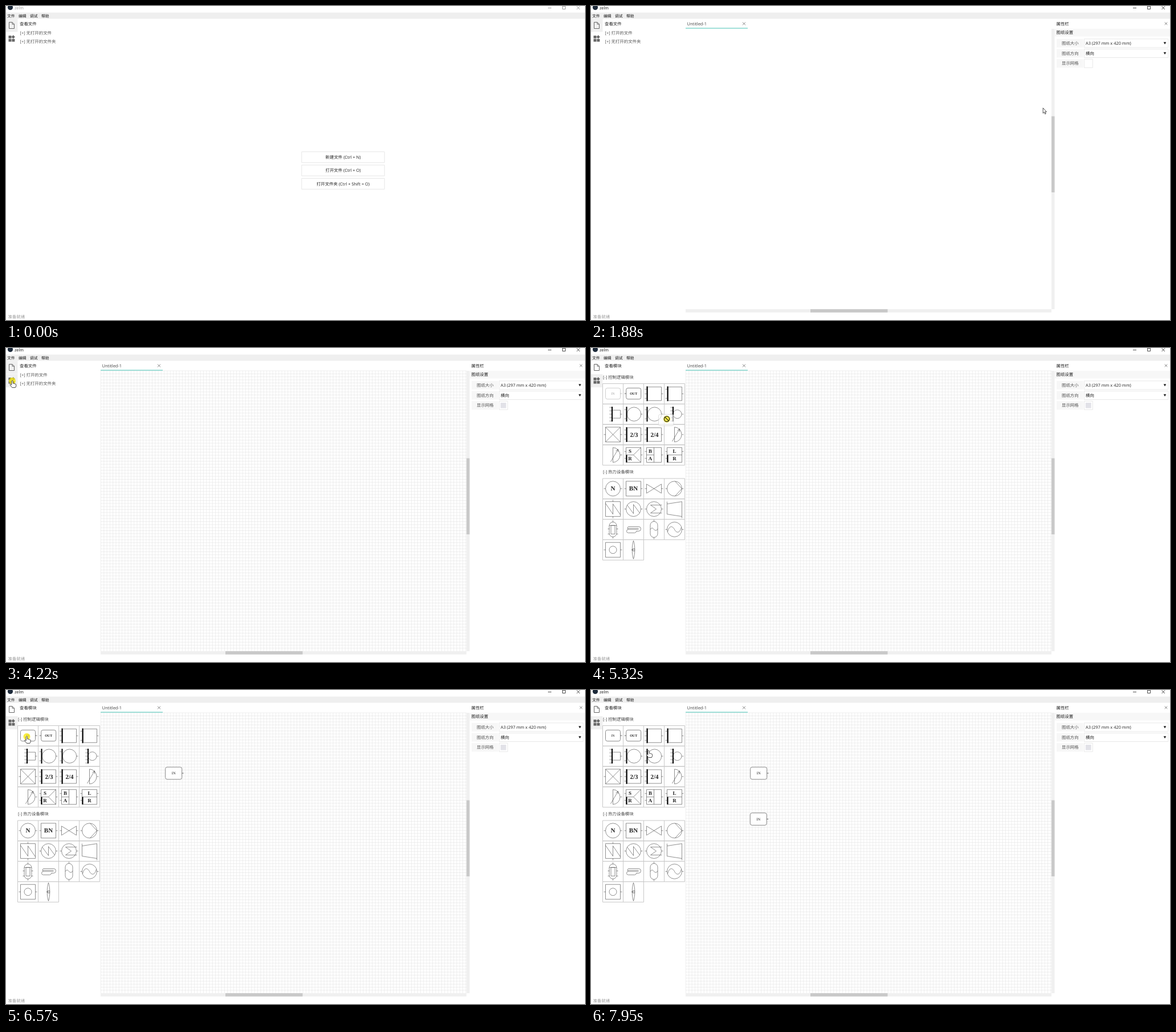
Animation of 1016x551 px, one loop 8 s. Source, as an HTML page with a canvas:

```html
<!DOCTYPE html>
<html lang="zh-CN">
<head>
<meta charset="utf-8">
<style>
html, body { margin: 0; width: 100%; height: 100%; overflow: hidden; background: #fff; }
canvas { display: block; }
</style>
</head>
<body>
<canvas id="stage" width="1016" height="551"></canvas>
<script>
const ctx = document.getElementById('stage').getContext('2d');
ctx.textRendering = 'geometricPrecision';
const SANS = '"Open Sans", "Noto Sans CJK SC", "Noto Sans CJK", sans-serif';
const SERIF = '"Liberation Serif", serif';
const LOOP = 8000;
const GRID = 5.292;

function rect(x, y, w, h, fill, stroke, radius = 0) {
  ctx.beginPath();
  ctx.roundRect(x, y, w, h, radius);
  if (fill) { ctx.fillStyle = fill; ctx.fill(); }
  if (stroke) { ctx.strokeStyle = stroke; ctx.lineWidth = 1; ctx.stroke(); }
}
function disc(x, y, r, fill) {
  ctx.beginPath();
  ctx.arc(x, y, r, 0, 7);
  ctx.fillStyle = fill;
  ctx.fill();
}
function line(d, color = '#333', width = 0.8, fill) {
  const path = new Path2D(d);
  if (fill) { ctx.fillStyle = fill; ctx.fill(path); }
  ctx.strokeStyle = color;
  ctx.lineWidth = width;
  ctx.stroke(path);
}
// y is the vertical middle of the glyphs
function text(s, x, y, color = '#333', size = 7.41, align = 'left') {
  ctx.font = size + 'px ' + SANS;
  ctx.textAlign = align;
  ctx.fillStyle = color;
  ctx.fillText(s, x, y + size * 0.36);
}
function serif(s, x, y, size, bold = true) {
  ctx.font = (bold ? 'bold ' : '') + size + 'px ' + SERIF;
  ctx.textAlign = 'center';
  ctx.fillStyle = '#222';
  ctx.fillText(s, x, y + size * 0.33);
}
function at(x, y, draw) {
  ctx.save();
  ctx.translate(x, y);
  draw();
  ctx.restore();
}

// ---- module palette: path pieces are relative to each cell centre
const box = (x, y, w, h) => `M${x},${y}h${w}v${h}h${-w}z`;
const ring = (r, x = 0, y = 0) => `M${x - r},${y}a${r},${r} 0 1 0 ${2 * r},0a${r},${r} 0 1 0 ${-2 * r},0`;
const capsule = (w, h) => `M${-w},${w - h}a${w},${w} 0 0 1 ${2 * w},0v${2 * (h - w)}a${w},${w} 0 0 1 ${-2 * w},0z`;
const pinL = (...ys) => ys.map(y => `M-16,${y}h3`).join('');
const pinR = 'M13,0h3';
const sides = pinL(0) + pinR;
const square = box(-13, -13, 26, 26);
const bar = 'M-12,-13v26';
const comb = x => [-12, -6, 0, 6, 12].map(y => `M${x},${y}h4`).join('');
const gate = box(-11, -12, 24, 24) + pinL(-8, 0, 8) + pinR;
const round = ring(12.2, 1) + pinL(-8, 8) + pinR;
const halfDisc = 'M0,-13A12.5,13 0 0 1 0,13zM-4,12L9,-10M9,-10l-4,3M9,-10l0,5M13,0h3';

// each entry: thin path, thick path, labels [text, x, y, size]
const logic = [
  null, null,
  [gate, bar],
  [box(-11, -12, 24, 24) + pinL(-8, 8) + pinR, bar],
  ['M-1,-7h14v14h-14' + pinR + comb(-6), 'M-1.5,-13v26'],
  [round, bar],
  [round, bar],
  [ring(7.5, 5) + pinR + comb(-7), 'M-2.5,-13v26'],
  [square + 'M-13,-13l26,26M13,-13l-26,26' + sides],
  [gate, bar, ['2/3', 1, 0, 11]],
  [gate, bar, ['2/4', 1, 0, 11]],
  [halfDisc], [halfDisc],
  [square + 'M-13,0H0L13,-13M0,0L13,13' + pinL(-6, 6) + pinR, 'M-12,0v13', ['S', -6, -6.5, 9], ['R', -6, 6.5, 9]],
  [square + 'M0,-13v26M-13,0h13' + pinL(-6, 6) + pinR, '', ['B', -6.5, -6.5, 9], ['A', -6.5, 6.5, 9]],
  [square + 'M-13,0h26' + pinL(-6, 6) + 'M13,-6h3', 'M-12,0v13', ['L', 0, -6.5, 9], ['R', 0, 6.5, 9]],
];
const thermal = [
  [ring(13) + sides, '', ['N', 0, 0, 11]],
  [square + sides, '', ['BN', 0, 0, 11]],
  ['M-13,-8v16L13,-8v16z' + sides],
  [ring(13) + 'M1,-13L13,0L1,13' + sides],
  [square + 'M-13,-10L0,9V-9L13,10M0,-16v3M0,13v3'],
  [ring(13) + 'M-11,-7L0,8V-8L11,7' + sides],
  [ring(13) + 'M14,-7H-6L4,0L-6,7H14' + sides],
  ['M-13,-9L13,-13V13L-13,9zM-13,-9v-4M13,13v3'],
  [capsule(6.5, 13) + box(-3.5, -7, 7, 15) + 'M-6.5,-7h13M-9,-1h3M-9,8h3M6,-1h3M6,8h3M0,-16v3M0,13v3'],
  ['M-9,-5H9a4,4 0 0 1 0,8H5a3,3 0 0 1 -3,3H-9a3,3 0 0 1 0,-6H9M-9,-5a3,3 0 0 0 0,5M-10,-2H9'],
  [capsule(6.5, 14) + 'M-6.5,0C-3,-5 -1,-1 0,0S4,4 6.5,-1M0,-17v3M0,14v3'],
  [ring(13) + 'M-12,4C-9,-8 -3,-6 0,0S9,8 12,-4' + sides],
  [square + ring(6.5) + sides],
  ['M0,-16C3,-9 3,9 0,16C-3,9 -3,-9 0,-16M-4,0h4M-1,-2h3v4h-3z'],
];

function palette(list, top) {
  list.forEach((icon, i) => {
    const x = 20.5 + i % 4 * 36, y = top + (i >> 2) * 35.8;
    rect(x, y, 36, 35.8, null, '#c8c8c8');
    if (!icon) return;
    at(x + 18, y + 17.8, () => {
      line(icon[0], '#444', 0.6);
      if (icon[1]) line(icon[1], '#000', 2);
      icon.slice(2).forEach(label => serif(...label));
    });
  });
}
function port(x, y, w, h, label, size, pin) {
  rect(x - w / 2, y - h / 2, w, h, '#fff', '#888', 3.2);
  line(`M${pin > 0 ? x + w / 2 : x - w / 2 - 3},${y}h3`, '#444', 0.8);
  serif(label, x, y, size, label === 'OUT');
}

// ---- window parts
function chrome(focused, modules, sideHover) {
  const ink = focused ? '#111' : '#999';
  disc(7.5, 2.5, 4.6, '#1d2a3a');
  text('zelm', 15, 3, ink, 7.2);
  line('M951,3.5h6M976.5,0.5h5v5h-5zM1001.5,0.5l5.5,5.5M1007,0.5l-5.5,5.5', focused ? '#222' : '#888', 0.8);
  rect(0, 11.5, 1016, 11, '#efefef');
  ['文件', '编辑', '调试', '帮助'].forEach((s, i) => text(s, 2 + i * 20, 17.3, '#111', 6.8));
  if (!modules) rect(0, 22.5, 20.5, 23, '#f0f0f0');
  if (modules || sideHover) rect(0, 46, 20.5, 23, '#f0f0f0');
  line('M5.5,28.5h5.5l3.5,3.5v7.5h-9zM11,28.5v3.5h3.5', '#666', 1);
  rect(4.5, 52, 5, 4.8, '#666');
  rect(4.5, 57.8, 5, 4.8, '#666');
  rect(10.4, 57.8, 5, 4.8, '#666');
  line('M12.7,51.2l3,3l-3,3l-3,-3z', '#666', 0.3, '#666');
  text('准备就绪', 3.5, 545, '#999');
}
function startPage(hover) {
  ['新建文件 (Ctrl + N)', '打开文件 (Ctrl + O)', '打开文件夹 (Ctrl + Shift + O)'].forEach((s, i) => {
    const y = 255.8 + i * 23.3, g = 255 - (i ? 0 : hover * 15);
    rect(518.8, y, 145.4, 19, `rgb(${g},${g},${g})`, '#e6e6e6');
    text(s, 591.5, y + 9.5, '#222', 7.41, 'center');
  });
}
function documentView(grid) {
  if (grid) {
    let d = '';
    for (let x = 166.5; x < 808; x += GRID) d += `M${x},40V532`;
    for (let y = 40; y < 532; y += GRID) d += `M166,${y}H808`;
    line(d, '#e0e0e0', 0.53);
  }
  text('Untitled-1', 168.5, 31, '#444', 7.5);
  line('M266,28.5l5,5M271,28.5l-5,5', '#555', 0.7);
  rect(166, 38.4, 109, 1.2, '#45c2b4');
  rect(808, 40, 5.5, 492, '#f0f0f0');
  rect(808, 193.5, 5.5, 133.5, '#c9c9c9');
  rect(166, 532, 642, 5.7, '#f0f0f0');
  rect(385, 532, 135.5, 5.7, '#c9c9c9');

  text('属性栏', 816.5, 31, '#222');
  line('M1006.7,28.5l4.6,4.6M1011.3,28.5l-4.6,4.6', '#555', 0.7);
  rect(814, 40, 202, 13.5, '#f7f7f7');
  text('图纸设置', 816.5, 46.7, '#222');
  ['图纸大小', '图纸方向', '显示网格'].forEach((s, i) => {
    const y = 65.3 + i * 17.7;
    rect(817, y - 7.5, 46.5, 15, '#f7f7f7');
    text(s, 826, y, '#555');
    rect(865.3, y - 7.5, i < 2 ? 147.5 : 15, 15, '#fff', '#e8e8e8');
    if (i < 2) {
      text(['A3 (297 mm x 420 mm)', '横向'][i], 868, y, '#222');
      line(`M1005,${y - 1.8}h4l-2,3.6z`, '#111', 0.3, '#111');
    }
  });
  if (grid) rect(867.8, 96, 9.8, 9.5, '#e2e2e8');
}
function sidePanel(modules, open, dragging) {
  text(modules ? '查看模块' : '查看文件', 24, 31, '#222');
  if (!modules) {
    text(open ? '[+] 打开的文件' : '[+] 无打开的文件', 24.5, 47.5, '#555');
    text('[+] 无打开的文件夹', 24.5, 62, '#555');
    return;
  }
  text('[-] 控制逻辑模块', 21, 51, '#444');
  text('[-] 热力设备模块', 21, 217.5, '#444');
  palette(logic, 62.5);
  palette(thermal, 229);
  ctx.globalAlpha = dragging ? 0.4 : 1;
  port(38.5, 80, 26, 19.5, 'IN', 6, 1);
  ctx.globalAlpha = 1;
  port(74.7, 80, 26, 19.5, 'OUT', 6, -1);
}

// ---- pointer: bursts of movement [first change, last change, count]
const bursts = [
  [90, 850, 11], [950, 1110, 3], [1260, 1420, 3], [1650, 2420, 11], [2590, 2660, 2],
  [2840, 3210, 6], [3540, 4070, 8], [4220, 4680, 7], [4840, 4910, 2], [5080, 5080, 1],
  [5230, 5620, 6], [5790, 6390, 9], [6570, 7170, 9], [7490, 7950, 7],
];
const track = [
  [90, 944, 538], [470, 640, 240], [850, 597, 259], [1110, 593, 260], [1573, 593, 260],
  [1880, 793, 179], [2420, 870, 102], [2766, 870, 102], [2990, 560, 157], [3060, 455, 151],
  [3210, 363, 138], [3464, 363, 138], [4070, 11, 57], [4300, 11, 57], [4680, 49, 78],
  [4910, 41, 78], [5150, 41, 78], [5230, 70, 95], [5308, 133, 124], [5620, 296, 145],
  [5712, 296, 145], [5790, 295, 150], [6390, 36.5, 81], [6645, 36.5, 81], [7170, 295, 226],
  [7410, 295, 226], [7490, 294, 231], [7950, 101, 106],
];
const within = (t, ...spans) => spans.some(([a, b]) => t >= a && t < b);

function hold(t) {
  const burst = bursts.filter(b => b[0] <= t).pop();
  if (!burst) return 0;
  const [from, to, n] = burst, step = (to - from) / (n - 1 || 1) || 1;
  return Math.min(to, from + Math.floor((t - from) / step + 0.05) * step);
}
function pointerAt(t) {
  let i = track.findIndex(k => k[0] >= t);
  if (i < 0) i = track.length - 1;
  const b = track[i], a = track[i - 1] || b;
  const p = Math.min(1, (t - a[0]) / (b[0] - a[0] || 1));
  return [a[1] + (b[1] - a[1]) * p, a[2] + (b[2] - a[2]) * p];
}
function pointer(x, y, kind, pressed) {
  at(x, y, () => {
    if (pressed) disc(0, 0.8, 6, 'rgba(246,232,20,.8)');
    if (kind === 'hand') {
      line('M-1.2,1q1.2,-2 2.4,0v4.2q1.2,-.8 2,.4q1.2,-.5 1.8,.6q1.6,-.2 1.6,1.4v2.2l-1.2,2.7h-5.6l-3.6,-4.6q0,-1.6 1.4,-1.1l1.2,1.1z', '#222', 0.8, '#fff');
    } else if (kind === 'blocked') {
      line(ring(4.6, 0, 0.5) + 'M-3.2,-2.7l6.4,6.4', '#222', 1.2);
    } else {
      line('M0,0v9.3l2.1,-1.9l1.5,3.4l1.5,-.7l-1.5,-3.2h2.7z', '#222', 0.8, '#fff');
    }
  });
}

function draw(t) {
  const q = hold(t);
  const open = q >= 1340, modules = q >= 4290;
  const dragging = within(q, [5230, 5790], [6640, 7490]);
  const pressed = within(q, [1260, 1340], [2590, 2660], [4220, 4290], [5080, 5790], [6570, 7490]);
  const [x, y] = pointerAt(q);

  rect(0, 0, 1016, 551, '#fff');
  chrome(q >= 1260, modules, q >= 4060);
  if (open) documentView(q >= 2660);
  else startPage(Math.max(0, Math.min(1, (q - 870) / 240)));
  sidePanel(modules, open, dragging);
  if (q >= 5790) port(294.2, 146, 29, 21.5, 'IN', 6.5, 1);
  if (q >= 7490) port(293.8, 226.5, 29, 21.5, 'IN', 6.5, 1);
  if (q < 90) return;

  if (dragging) {
    ctx.globalAlpha = 0.6;
    rect(x - 14.5, y - 7.5, 26.5, 20, '#fff', '#ccc', 3);
    ctx.globalAlpha = 1;
  }
  const clickable = x < 165 && y > 46 || within(q, [950, 1340]);
  pointer(x, y, !clickable ? 'arrow' : dragging ? 'blocked' : 'hand', pressed);
}

const start = performance.now();
function tick() {
  draw((performance.now() - start) % LOOP);
  requestAnimationFrame(tick);
}
tick();
</script>
</body>
</html>
```
